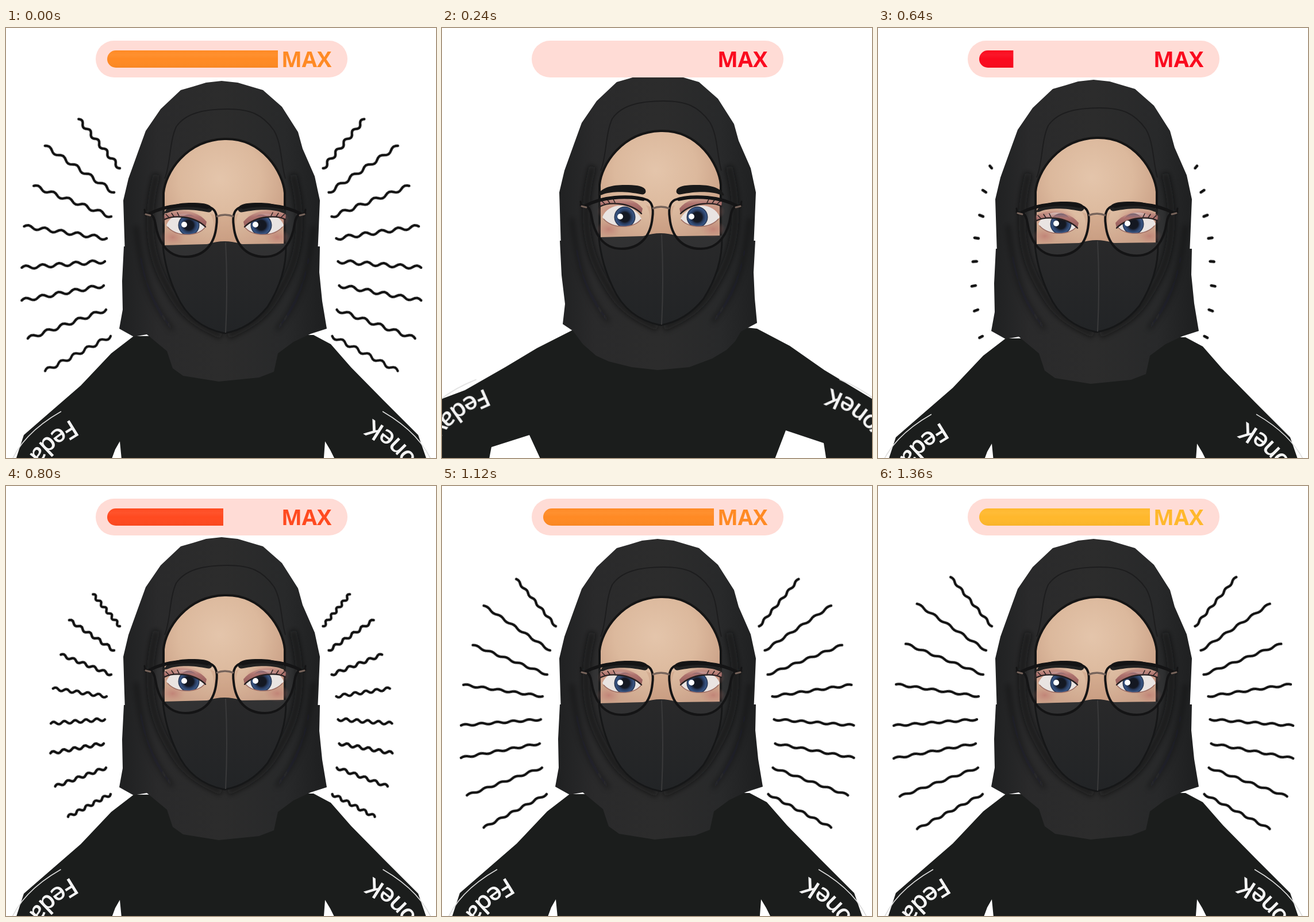
An HTML page without scripts that plays this animation: 748 px wide and 748 px high, repeating every 1.44 s.

```html
<!DOCTYPE html>
<html lang="en">
<head>
<meta charset="utf-8">
<title>Power gauge</title>
<style>
html, body { margin: 0; width: 100%; height: 100%; overflow: hidden; background: #fff; }
svg { display: block; width: 100vw; height: 100vh; }

/* 18 poses of 80 ms per loop; steps(n) holds each pose between keyframes */
.head, .body, .hem, .bob, .lid, .brow, .print { animation: 1440ms steps(3) -1ms infinite; }
.gauge, .fill, .ray { animation: 1440ms step-end -1ms infinite; }
.head { animation-name: head; }
.body { animation-name: body; }
.hem { animation-name: hem; }
.bob { animation-name: bob; }
.lid { animation-name: lid; }
.brow { animation-name: brow; }
.print { animation-name: print; }
.gauge { animation-name: tint; }
.fill { animation-name: fill; transform-origin: 176px 54px; }
.ray { animation-name: ray; }

@keyframes head {
  0%, 77.778%, to { transform: none; }
  16.667% { transform: translateY(-14px); animation-timing-function: steps(2); }
  27.778% { transform: translateY(-16px); }
  44.444% { transform: translateY(-2px); animation-timing-function: steps(4); }
  66.667% { transform: translateY(-4px); animation-timing-function: steps(2); }
}
@keyframes bob {
  0%, 16.667%, 27.778%, 77.778%, to { transform: none; }
  44.444% { transform: translateY(4px); animation-timing-function: steps(4); }
  66.667% { transform: translateY(-2px); animation-timing-function: steps(2); }
}
@keyframes body {
  0%, 44.444%, to { d: path("M222 536 183 566 130 622 62 681 31 708 14 760 180 760 190 733 198 719 202 760 552 760 555 719 564 734 577 760 735 760 717 708 655 646 600 590 565 550 535 534Z"); }
  16.667% { d: path("M230 524 165 557 110 590 40 630 0 645 -40 760 80 760 86 729 152 708 176 760 575 760 598 700 664 722 670 760 790 760 748 645 665 595 605 553 548 523 520 520Z"); animation-timing-function: steps(2); }
  27.778% { d: path("M222 511 175 545 120 612 60 662 30 692 24 760 98 760 112 733 208 700 212 760 548 760 545 695 640 738 654 760 727 760 718 688 665 632 600 562 565 530 530 509Z"); }
}
@keyframes hem {
  0%, 44.444%, to { d: path("M205 380 202 440 203 490 197 523 222 537 245 533 280 562 290 592 308 605 370 615 440 608 466 598 473 566 500 546 530 532 558 523 550 475 545 425 546 380Z"); }
  16.667% { d: path("M205 370 208 430 214 480 210 515 228 527 245 550 268 570 290 580 330 590 375 595 430 590 470 575 495 560 510 545 520 528 548 513 544 470 542 425 545 370Z"); animation-timing-function: steps(2); }
  27.778% { d: path("M206 370 205 430 212 470 208 498 225 512 250 508 272 535 288 570 306 584 370 594 440 588 466 576 468 548 500 522 528 509 548 492 546 460 543 420 545 370Z"); }
}
@keyframes lid {
  0%, 66.667%, to { transform: none; }
  16.667%, 27.778% { transform: translateY(-9px); }
  44.444% { transform: translateY(4px); animation-timing-function: steps(4); }
}
@keyframes brow {
  0%, 44.444%, to { transform: none; }
  16.667%, 27.778% { transform: translate(-4px, -17px); }
}
@keyframes print {
  0%, 77.778%, to { transform: none; }
  16.667% { transform: translate(calc(var(--side) * -38px), -54px) rotate(calc(var(--side) * 8deg)); animation-timing-function: steps(2); }
  27.778% { transform: translate(calc(var(--side) * 5px), -28px) rotate(calc(var(--side) * -4deg)); }
  44.444% { transform: translate(calc(var(--side) * -3px), 1px); animation-timing-function: steps(4); }
  66.667% { transform: translate(calc(var(--side) * 2px), -3px); animation-timing-function: steps(2); }
}
@keyframes tint {
  0%, 66.667%, 77.778%, 88.889%, to { color: #ff8a24; }
  5.556% { color: #fa0a1e; }
  55.556% { color: #ff4a20; }
  61.111% { color: #ff6a22; }
  72.222%, 83.333%, 94.444% { color: #ffb82c; }
}
@keyframes fill {
  0%, 66.667%, to { transform: none; }
  5.556% { transform: scaleX(0); }
  27.778% { transform: scaleX(.005); }
  33.333% { transform: scaleX(.02); }
  38.889% { transform: scaleX(.08); }
  44.444% { transform: scaleX(.2); }
  50% { transform: scaleX(.42); }
  55.556% { transform: scaleX(.68); }
  61.111% { transform: scaleX(.92); }
}
@keyframes ray {
  0%, to { transform: none; opacity: 1; }
  5.556% { transform: scale(.05); opacity: 0; }
  44.444% { transform: scale(.05); opacity: 1; }
  50% { transform: scale(.4, .6); }
  55.556% { transform: scale(.65, .8); }
  61.111% { transform: scale(.78, .9); }
  66.667% { transform: scale(.87, 1); }
  72.222% { transform: scale(.92, .75); }
  77.778% { transform: scale(.96, .5); }
  83.333% { transform: scale(.98, .8); }
  88.889% { transform: scale(.99, .9); }
  94.444% { transform: scale(1, .5); opacity: 1; }
}
</style>
</head>
<body>
<svg viewBox="0 0 748 748">
  <defs>
    <linearGradient id="cloth" gradientUnits="userSpaceOnUse" x1="203" x2="548" y1="0" y2="0">
      <stop offset="0" stop-color="#202122"/><stop offset=".18" stop-color="#2a2a2b"/>
      <stop offset=".5" stop-color="#2c2c2c"/><stop offset=".82" stop-color="#28292a"/>
      <stop offset="1" stop-color="#1f2021"/>
    </linearGradient>
    <linearGradient id="maskTone" x2="0" y2="1">
      <stop stop-color="#29292a"/><stop offset="1" stop-color="#222426"/>
    </linearGradient>
    <radialGradient id="skin" gradientUnits="userSpaceOnUse" cx="372" cy="262" r="130">
      <stop stop-color="#e4c5ab"/><stop offset=".55" stop-color="#dcb99d"/><stop offset="1" stop-color="#c99f85"/>
    </radialGradient>
    <radialGradient id="blush">
      <stop stop-color="#b5605f" stop-opacity=".85"/><stop offset="1" stop-color="#c67d77" stop-opacity="0"/>
    </radialGradient>
    <radialGradient id="iris">
      <stop offset=".45" stop-color="#0a0e19"/><stop offset=".62" stop-color="#1f3256"/>
      <stop offset=".86" stop-color="#2f4f80"/><stop offset="1" stop-color="#18223a"/>
    </radialGradient>
    <linearGradient id="lidTone" x2="0" y2="1">
      <stop stop-color="#b9807a" stop-opacity=".3"/><stop offset=".4" stop-color="#aa6c68"/>
      <stop offset="1" stop-color="#8f5653"/>
    </linearGradient>
    <linearGradient id="gloss" x2="0" y2="1">
      <stop stop-color="#fff" stop-opacity="0"/><stop offset=".25" stop-color="#fff" stop-opacity=".05"/>
      <stop offset=".5" stop-color="#fff" stop-opacity="0"/><stop offset="1" stop-opacity=".03"/>
    </linearGradient>
    <filter id="soft" x="-30%" y="-30%" width="160%" height="160%"><feGaussianBlur stdDeviation="5"/></filter>
    <clipPath id="eyeShape"><path d="M279 343C288 318 330 314 347 346 336 363 295 366 279 343Z"/></clipPath>
    <clipPath id="gaugeShape"><path d="M473 39V69H191a15 15 0 0 1 0-30Z"/></clipPath>
    <path id="wave" d="M0 0q7.25-6 14.5 0t14.5 0 14.5 0 14.5 0 14.5 0 14.5 0 14.5 0 14.5 0 14.5 0 14.5 0" vector-effect="non-scaling-stroke"/>
    <path id="leftSleeve" d="M114 680Q44 720 24 775"/>
    <path id="rightSleeve" d="M726 775Q706 720 637 680"/>

    <g id="eyeball">
      <ellipse cx="307" cy="333" rx="38" ry="19" fill="url(#blush)"/>
      <ellipse cx="290" cy="364" rx="22" ry="15" fill="url(#blush)" opacity=".6"/>
      <g clip-path="url(#eyeShape)">
        <path fill="#e8e3e1" d="M270 310H355V370H270Z"/>
        <circle cx="318" cy="343" r="18.5" fill="url(#iris)"/>
      </g>
      <path d="M281 346C297 364 334 363 346 347" fill="none" stroke="#98665c" stroke-width="1.5"/>
    </g>
    <g id="lidShape">
      <path fill="url(#lidTone)" d="M276 333C290 326 326 325 347 346L349 337C330 313 286 313 275 325Z"/>
      <g fill="none" stroke="#1c1516" stroke-linecap="round">
        <path stroke-width="2.4" d="M276 333C290 326 326 325 347 346"/>
        <path stroke-width="1.5" d="M283 329l-5-5M292 328l-4-6M301 327l-3-6"/>
      </g>
    </g>
    <path id="browShape" fill="#191919" d="M276 320C283 308 300 304 322 304 340 304 352 305 357 311 361 317 356 322 349 320 330 316 302 314 285 320 278 323 274 323 276 320Z"/>
  </defs>

  <g fill="none" stroke="#111" stroke-width="4.4" stroke-linecap="round">
    <g transform="translate(198 244)rotate(230)scale(.77 1)"><use class="ray" href="#wave"/></g>
    <g transform="translate(188 286)rotate(214)"><use class="ray" href="#wave"/></g>
    <g transform="translate(183 328)rotate(201.6)"><use class="ray" href="#wave"/></g>
    <g transform="translate(175 366)rotate(188.3)"><use class="ray" href="#wave"/></g>
    <g transform="translate(172 406)rotate(175.7)"><use class="ray" href="#wave"/></g>
    <g transform="translate(170 448)rotate(169.7)"><use class="ray" href="#wave"/></g>
    <g transform="translate(174 490)rotate(159.8)"><use class="ray" href="#wave"/></g>
    <g transform="translate(182 536)rotate(152)scale(.89 1)"><use class="ray" href="#wave"/></g>
    <g transform="matrix(-1 0 0 1 749.5 0)">
      <g transform="translate(198 244)rotate(230)scale(.77 1)"><use class="ray" href="#wave"/></g>
      <g transform="translate(188 286)rotate(214)"><use class="ray" href="#wave"/></g>
      <g transform="translate(183 328)rotate(201.6)"><use class="ray" href="#wave"/></g>
      <g transform="translate(175 366)rotate(188.3)"><use class="ray" href="#wave"/></g>
      <g transform="translate(172 406)rotate(175.7)"><use class="ray" href="#wave"/></g>
      <g transform="translate(170 448)rotate(169.7)"><use class="ray" href="#wave"/></g>
      <g transform="translate(174 490)rotate(159.8)"><use class="ray" href="#wave"/></g>
      <g transform="translate(182 536)rotate(152)scale(.89 1)"><use class="ray" href="#wave"/></g>
    </g>
  </g>

  <g class="bob">
    <path class="body" fill="#1b1d1c"/>
    <g fill="#f4f4f4" font-family="'Open Sans', sans-serif" font-size="43" font-weight="600">
      <g class="print" style="--side:1;transform-origin:108px 678px">
        <use href="#leftSleeve" x="-18" y="-13" fill="none" stroke="#ddd" stroke-width="1.5"/>
        <text><textPath href="#leftSleeve">Fedavun</textPath></text>
      </g>
      <g class="print" style="--side:-1;transform-origin:642px 678px">
        <use href="#rightSleeve" x="18" y="-13" fill="none" stroke="#ddd" stroke-width="1.5"/>
        <text text-anchor="end"><textPath href="#rightSleeve" startOffset="100%">voneK</textPath></text>
      </g>
    </g>
    <path class="hem" fill="url(#cloth)"/>
  </g>

  <g class="head">
    <path fill="url(#cloth)" d="M375 92 348 95 325 102 304 108 269 141 243 179 231 212 213 262 204 300 207 395 300 530 380 545 460 530 542 395 546 300 537 258 516 210 508 181 480 137 447 108 430 103 403 95Z"/>
    <g id="folds" fill="none" stroke="#121314" filter="url(#soft)">
      <path d="M262 255C245 320 246 385 275 440S320 510 375 535" stroke-width="12" opacity=".65"/>
      <path d="M226 345C235 420 245 470 290 525" stroke-width="7" opacity=".35"/>
    </g>
    <use href="#folds" transform="matrix(-1 0 0 1 761 0)"/>
    <path fill="none" stroke="#1d1d1e" stroke-width="2" d="M276 262C286 240 284 198 296 172 312 148 345 141 385 141S446 150 466 178C480 202 478 235 486 262"/>

    <path fill="url(#skin)" stroke="#151515" stroke-width="4" d="M274 382V287C277 252 313 195 380 193S482 252 485 287V382Z"/>
    <path d="M355 322Q368 345 357 372H403Q394 345 405 322 380 334 355 322" fill="#b98669" opacity=".28"/>
    <path fill="url(#maskTone)" d="M273 378 350 376Q366 371 380 371T411 376L487 375C489 420 474 455 455 485 435 510 410 526 380 531 345 524 315 505 297 465 280 435 273 405 273 378Z"/>
    <path d="M273 380C276 410 284 438 297 465 315 505 345 524 380 531 410 526 435 510 455 485 474 455 488 420 487 378" fill="none" stroke="#161718" stroke-width="3"/>
    <path d="M382 373Q386 450 382 530" fill="none" stroke="#3a3a3b" stroke-width="2"/>

    <use href="#eyeball"/>
    <use class="lid" href="#lidShape"/>
    <use class="brow" href="#browShape"/>
    <g transform="matrix(-1 0 0 1 762 0)">
      <use href="#eyeball"/>
      <use class="lid" href="#lidShape"/>
      <use class="brow" href="#browShape"/>
    </g>
    <g fill="#fff"><circle cx="310" cy="342" r="5"/><circle cx="434" cy="342" r="5"/></g>

    <g id="lens" fill="none" stroke="#141415" stroke-linecap="round">
      <path fill="#fff" fill-opacity=".045" stroke-width="4" d="M256 320C284 305 334 304 357 313 367 318 368 330 366 344 363 376 345 398 312 398 278 398 264 368 260 341Q258 328 252 324"/>
      <path stroke-width="5.5" d="M250 323C276 309 318 305 350 312"/>
      <path stroke-width="3" d="M241 316 243 326M241 322 252 324"/>
      <path stroke="#75635a" stroke-width="3" d="M243 324 251 326"/>
    </g>
    <use href="#lens" transform="matrix(-1 0 0 1 762 0)"/>
    <path d="M366 328Q381 322 396 328" fill="none" stroke="#77645b" stroke-width="3.5"/>
  </g>

  <rect x="156" y="22" width="438" height="64" rx="32" fill="#ffdcd6"/>
  <g class="gauge" fill="currentColor">
    <g clip-path="url(#gaugeShape)">
      <g class="fill">
        <rect x="176" y="39" width="297" height="30"/>
        <rect x="176" y="39" width="297" height="30" fill="url(#gloss)"/>
      </g>
    </g>
    <text x="479" y="68" font-family="'Open Sans', 'Noto Sans', sans-serif" font-size="38" font-weight="700">MAX</text>
  </g>
</svg>
</body>
</html>
```
